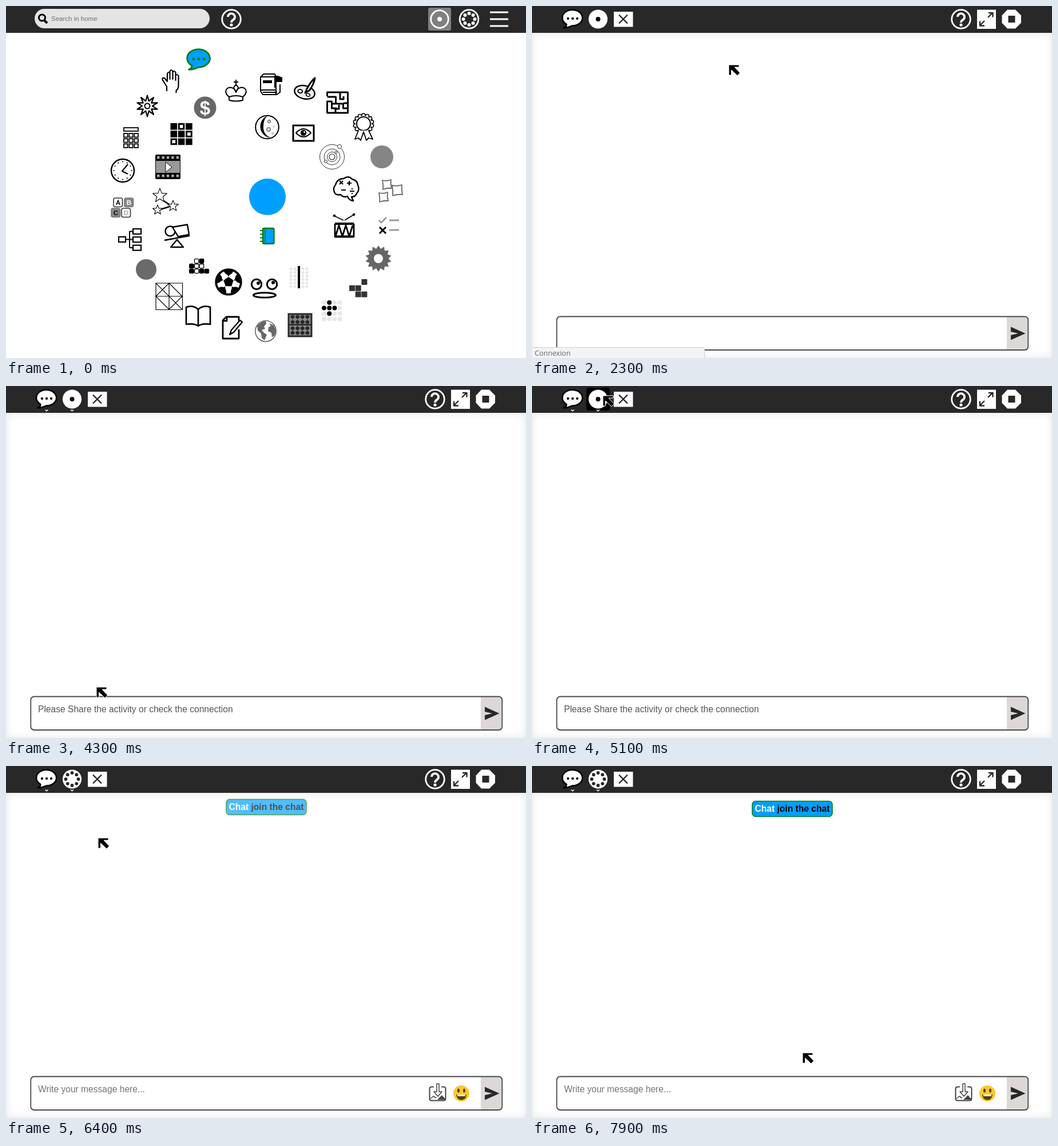
An HTML page for the animation above (8 s loop, 909 by 616 pixels).

```html
<!DOCTYPE html>
<html lang="en">
<head>
<meta charset="utf-8">
<title>Opening a shared chat</title>
<style>
html, body { margin: 0; width: 100%; height: 100%; overflow: hidden; background: #fff; }
svg { position: absolute; left: 0; top: 0; display: block; }
#shade { position: absolute; left: 0; top: 47px; width: 909px; height: 569px; box-shadow: inset 0 0 16px rgba(0,0,0,.1); }
text { font-family: "Liberation Sans", Arial, sans-serif; }
</style>
</head>
<body>
<div id="shade"></div>
<svg id="stage" width="909" height="616" viewBox="0 0 909 616"></svg>
<script>
const BLUE = '#009fff', GREEN = '#087f12', DARK = '#282828', GREY = '#666';

// Shape helpers, each returns SVG markup
const path = (d, w = 2, fill = 'none', stroke = '#000') =>
  `<path d="${d}" fill="${fill}" stroke="${stroke}" stroke-width="${w}" stroke-linejoin="round"/>`;
const solid = (d, fill = '#000') => `<path d="${d}" fill="${fill}"/>`;
const circ = (x, y, r, fill = '#000', stroke = 'none', w = 0) =>
  `<circle cx="${x}" cy="${y}" r="${r}" fill="${fill}" stroke="${stroke}" stroke-width="${w}"/>`;
const oval = (x, y, rx, ry, fill = '#000', stroke = 'none', w = 0) =>
  `<ellipse cx="${x}" cy="${y}" rx="${rx}" ry="${ry}" fill="${fill}" stroke="${stroke}" stroke-width="${w}"/>`;
const rect = (x, y, w, h, fill = '#000', stroke = 'none', sw = 0, r = 0) =>
  `<rect x="${x}" y="${y}" width="${w}" height="${h}" rx="${r}" fill="${fill}" stroke="${stroke}" stroke-width="${sw}"/>`;
const text = (x, y, size, s, fill = '#000', more = '') =>
  `<text x="${x}" y="${y}" font-size="${size}" fill="${fill}" ${more}>${s}</text>`;
const group = (id, body) => `<g id="${id}">${body}</g>`;
const move = (x, y, body) => `<g transform="translate(${x} ${y})">${body}</g>`;
const times = (n, f) => Array.from({ length: n }, (_, i) => f(i)).join('');
const grid = (cols, rows, f) => times(rows, r => times(cols, c => f(c, r)));
const polar = (x, y, r, a) => [x + r * Math.sin(a), y - r * Math.cos(a)];
const star = (x, y, n, out, inn) => 'M' + Array.from({ length: 2 * n }, (_, i) =>
  polar(x, y, i % 2 ? inn : out, i * Math.PI / n).map(v => v.toFixed(1))).join('L') + 'Z';
const ring = (x, y, r, n, f) => times(n, i => f(...polar(x, y, r, i * 2 * Math.PI / n)));

const bubble = (x, y, k, fill, line, dot) => move(x, y, `<g transform="scale(${k})">` +
  path('M-12,11A19.5,15.5 0 1 1 -1,14Q-9,18 -17,18Q-11,15 -12,11Z', 2.8, fill, line) +
  times(3, i => circ(9 * i - 9, 0, 2.4, dot)) + '</g>');
const help = x => circ(x, 23, 16.3, 'none', '#fff', 2.8) +
  path(`M${x - 6},19a6,6 0 1 1 9.5,5q-3.5,2 -3.5,5`, 3.8, 'none', '#fff') + circ(x, 33, 2.6, '#fff');
const disc = (x, y, shared) => circ(x, y, 16.6, '#fff') + (shared
  ? ring(x, y, 11, 8, (a, b) => circ(a, b, 2.9, DARK)) : circ(x, y, 4, '#000'));

const homeBar = rect(50, 5, 306, 34, '#e4e4e4', 'none', 0, 17) +
  circ(63, 20.5, 5.5, 'none', '#000', 3) + path('M67,25L72,30', 4) +
  text(79, 26, 11.5, 'Search in home', '#707070') + help(394) +
  rect(738, 3, 40, 40, '#808080', 'none', 0, 3) + circ(758, 23, 15.3, 'none', '#fff', 2.8) + circ(758, 23, 4, '#fff') +
  circ(809.5, 23, 16.3, 'none', '#fff', 2.8) + ring(809.5, 23, 10, 8, (x, y) => circ(x, y, 3, '#fff')) +
  path('M846,11h32M846,23h32M846,35h32', 2.8, 'none', '#fff');

const tiles = { A: [188, 336, '#fff', '#000'], B: [207, 336, '#888', '#fff'], C: [184, 354, '#888', '#000'], D: [202, 354, '#fff', '#aaa'] };
const icons = [
  bubble(337, 93, 1.02, BLUE, GREEN, GREEN),
  // hand, king, books
  path('M281,149v-8l-7,-11q-2,-5 3,-4l5,6v-14q2.5,-4 4.5,0v10v-14q2.5,-4 5,0v14v-12q2.5,-4 5,0v14v-8q2.5,-4 5,0v17q0,6 -4,9v4', 2.2),
  path('M390,165v-6q-8,-6 -5,-13q6,-7 15,0l2,5l2,-5q9,-7 15,0q3,7 -5,13v6q-12,3 -24,0M390,159q12,-4 24,0M402,129v11M398,133h8M402,151l-4,-8q4,-9 8,0z', 1.9),
  path('M450,119h20l2,5h-27v25l4,6h24l6,-4v-14M445,125l5,-6M445,147h27M449,151h25M472,124v31', 2),
  solid('M469,122h6l8,3v8h-10v10h-4zM449,130h16v5h-16z'),
  // paint, maze, award
  `<g transform="rotate(14 522 151)">${oval(522, 151, 18, 11.5, '#eee', '#000', 2.4)}${oval(514, 151, 4, 3, '#fff', '#000', 2)}${oval(529, 154, 3.5, 2.5, '#fff', '#000', 1.6)}</g>`,
  path('M540,126Q532,133 526,145l-3,7l7,-4Q538,138 540,126z', 3, '#fff'),
  path('M561.5,158v-7h36v36h-36v-20h8v12h9M561.5,159h15v12h13v8h8M569,151v0M584,151v12h6v-5M576,187v-7h6v-7M597,170h-7M569,171h7', 3),
  ring(625, 206, 15, 14, (x, y) => circ(x, y, 3, '#fff', '#000', 1.6)) + circ(625, 206, 14, '#fff') + circ(625, 206, 12, '#fff', '#000', 2),
  path('M616,218l-6,15l6,-2l4,4l5,-15l5,15l4,-4l7,2l-7,-15', 1.8, '#fff'),
  // gear, coin, calculator, grid
  path(star(247, 175, 10, 18.5, 9), 2.2) + circ(247, 175, 4.5, 'none', '#000', 2),
  circ(348, 178, 19.5, '#676767') + text(348, 190, 33, '$', '#fff', 'text-anchor="middle" font-weight="bold"'),
  rect(206, 213, 25, 6, '#fff', '#000', 1.8) + grid(3, 3, (c, r) => rect(206 + 9.2 * c, 223 + 9.2 * r, 6.5, 6.5, '#fff', '#000', 1.8)),
  grid(3, 3, (c, r) => rect(287.5 + 13.3 * c, 205 + 13.3 * r, 11.6, 11.6) +
    ([1, 5, 6].includes(c + 3 * r) ? rect(290.5 + 13.3 * c, 208 + 13.3 * r, 5.6, 5.6, '#fff') : '')),
  // film, clock, letters, stars
  rect(261, 260, 44, 43, '#000', 'none', 0, 2) + rect(262, 271, 42, 21, '#999') +
    grid(5, 2, (c, r) => rect(264 + 8.4 * c, 263 + 32 * r, 4.5, 4.5, '#aaa', 'none', 0, 1)) + path('M279,273l11,9l-11,9z', 1, '#fff'),
  circ(204, 288, 20, '#fff', '#000', 2.4) + path('M213,277L203,289L213,294', 2.2) + ring(204, 288, 15.5, 12, (x, y) => circ(x, y, 1.1)),
  Object.entries(tiles).map(([k, [x, y, f, c]]) => rect(x, y, 15.5, 15.5, f, f == '#fff' ? '#333' : '#777', 1.6, 3) +
    text(x + 7.8, y + 12, 11.5, k, c, 'text-anchor="middle" font-weight="bold"')).join(''),
  path('M271,338L288,349M270,356L286,351', 2.6) + [[269, 332, 13], [265, 357, 9], [292, 350, 10]].map(([x, y, r]) => path(star(x, y, 5, r, r * .42), 1.1, '#fff')).join(''),
  // tree, scales
  path('M209,408.5h13M216,394v29M216,394.5h6M216,423h6', 2) + rect(197, 404, 12, 9, '#fff', '#000', 2.2) +
    times(3, i => rect(222, 390 + 14.3 * i, 14, 9, '#fff', '#000', 2.2)),
  circ(287, 394, 8.5, '#fff', '#000', 2.5) + path('M277,410L321,402M291,387l26,-4.500l3,17.500l-19,3.500z M299,409l-11,13h22z', 2.4, '#fff'),
  circ(245, 461, 18, '#6a6a6a'),
  // blocks, puzzle, ball
  [[1, 0, 0], [2, 0, 1], [0, 1, 1], [1, 1, 0], [2, 1, 0], [0, 2, 1], [1, 2, 0], [2, 2, 1], [3, 2, 1]].map(([c, r, on]) =>
    rect(320.7 + 8.8 * c, 442.7 + 8.8 * r, 7.4, 7.4, on ? '#000' : '#fff', '#000', 1.3, 1.5)).join(''),
  path('M262,485h46.500v46.500h-46.500zM262,508h46M285,485l23,23l-23,23l-23,-23zM262,485l46,46M285,485v46', 1.2),
  circ(389, 483, 21.8, '#fff', '#000', 3.8) + solid(star(389, 483, 5, 9, 7.3)) +
    times(5, i => `<g transform="rotate(${72 * i} 389 483)">${solid('M380,463h18l-3,5l-6,4l-6,-4z')}${path('M389,473v-4', 1.5)}</g>`),
  // book, face, dotted line
  path('M336,531Q328,523 315,527v30Q329,555 336,560Q343,555 357,557v-30Q344,523 336,531v28', 2.7, '#fff'),
  [438, 465].map(x => circ(x, 487, 8.7, '#fff', '#000', 3)).join('') + circ(441, 485, 3) + circ(467, 484, 3) + oval(452, 506, 19.5, 4.3, '#fff', '#000', 3),
  grid(5, 6, (c, r) => circ(498 + 7 * c, 460 + 6.2 * r, 2.5, '#e6e6e6')) + rect(510, 455, 4, 39),
  // moon, eye, planets
  circ(456.5, 212, 20.3, '#fff', '#000', 2) + solid('M457,192A20.3,20.3 0 0 0 463,231Q449,225 450,210Q450,199 457,192z') +
    circ(460, 202, 2.5, '#ddd', '#000', .8) + circ(459, 216, 3.5, '#ddd', '#000', .8) + circ(468, 211, 2.2, '#ddd') + circ(466, 223, 2.5, '#ccc'),
  rect(502, 209, 36, 27, '#fff', '#000', 3) + path('M507,222Q520,208 533,222Q520,236 507,222z', 2.2) + circ(520, 222, 5.2) + circ(521.5, 220.500, 1.5, '#fff'),
  [21.5, 14, 8.5].map(r => circ(570, 264, r, 'none', '#333', 1)).join('') + circ(570, 264, 5, '#fff', '#333', 1.2) +
    circ(583, 246, 3.5, '#fff', '#333', 1) + circ(559, 272, 2.5, '#fff', '#333', 1) + circ(577, 256, 2, '#fff', '#333', 1),
  circ(657, 264, 20, '#858585'),
  // brain, notes, drum, list
  path('M585,330q-8,2 -11,-4q-3,-8 2,-13q3,-11 14,-11q9,-6 15,1q9,2 10,10q4,9 -2,15q-2,6 -9,6l3,7q-8,-1 -10,-8q-7,3 -12,-3z', 2.4, '#fff') +
    path('M583,306l6,6m0,-6l-6,6M600,306v8m-4,-4h8M586,322h8M601,324h8', 2.2) + circ(605, 320, 1.2) + circ(605, 328, 1.2),
  [[658, 305, 15], [675, 314, 17], [652, 327, 15]].map(([x, y, s]) => path(`M${x},${y}q${s / 2},2 ${s},-1q-1,${s / 2} 1,${s}q${-s / 2},-1 ${-s},2q1,${-s / 2} -1,${-s - 1}z`, 1.8, '#fff', GREY)).join(''),
  rect(575, 379, 33, 4) + path('M575,381v23h33v-23M576,403l6,-19l6,19l6,-19l6,19l6,-19M575,403h33', 2.8) + path('M573,367l17,8M610,364l-18,11', 1.8) + circ(574, 367, 2.3) + circ(608, 365, 2.3),
  path('M652,375l4,4l9,-9', 2.8, 'none', '#999') + path('M670,375h17M670,392h17', 3, 'none', '#999') + path('M653,387l11,11m0,-11l-11,11', 3),
  // burst, pieces, dots, abacus
  solid(star(651, 442, 14, 23, 17.5), GREY) + circ(651, 442, 8, '#fff'),
  [[2, 0], [0, 1], [1, 1], [1, 2], [2, 2]].map(([c, r]) => rect(600 + 10.700 * c, 478 + 10.8 * r, 10, 10, '#333')).join(''),
  grid(4, 4, (c, r) => circ(556 + 9.2 * c, 519 + 9.6 * r, 4, [1, 4, 5, 6, 9].includes(c + 4 * r) ? '#000' : '#e8e8e8')),
  rect(494, 539, 40, 39, '#8a8a8a', '#2a2a2a', 3) + times(4, i => path(`M${501 + 8.600 * i},540v37`, 1, 'none', DARK) +
    [544, 553, 564, 572].map(y => oval(501 + 8.6 * i, y, 3.6, 2.9, DARK)).join('')) + rect(494, 556.5, 40, 2.5, DARK),
  // globe, page, journal
  circ(454, 569, 18.2, '#fff', GREY, 1.6) + solid('M439,560q6,-8 15,-9l1,5l-4,5l2,4l-6,2l4,5l5,3l-4,10l-5,-4l-1,-8l-6,-5zM460,555l8,4l4,9l-2,8l-5,4l-1,-8l-6,-3l1,-7l4,-2z', GREY),
  path('M407,566v16h-28v-32l6,-6h22v7M386,544v7h-7', 2.8) + path('M413,553l-15,18l-7,4l3,-8l15,-17z', 2.2, '#fff') + solid('M391,575l1.500,-5l4,3z'),
  rect(449, 389, 19.500, 27, BLUE, GREEN, 2.4, 2) + path('M453,389v27', 1.6, 'none', GREEN) + times(4, i => path(`M444,${393 + 6.300 * i}h7`, 2, 'none', GREEN)),
  circ(457, 334, 32, BLUE)
].join('');

const spots = [[462.5, 136.5], [402, 148], [337.5, 94]];
const home = times(spots.length, i => group('spot' + i, rect(spots[i][0] - 25.5, spots[i][1] - 25.5, 51, 51, '#cbcbcb', 'none', 0, 3))) + homeBar + icons;

const chat = group('pressed', rect(95, 3, 41, 40, '#000', 'none', 0, 4)) +
  bubble(71, 22, .9, '#fff', '#000', '#000') +
  group('alone', disc(115.5, 23, false)) + group('shared', disc(115.5, 23, true)) +
  group('chevrons', path('M68.500,41.500l2.500,2.200l2.500,-2.200M113,41.500l2.500,2.200l2.500,-2.200', 1.500, 'none', '#fff')) +
  rect(143, 10, 33.5, 26.5, '#fff') + path('M152,15.500l15,15m0,-15l-15,15', 2.4, 'none', DARK) + help(750) +
  rect(778, 6.5, 33, 33.5, '#fff') + path('M797,20l8,-8M798,12h7.500v7.500M791,26l-8,8M783,26.500v8h8', 2.4, 'none', DARK) +
  solid('M831,6.500h14l10,10v13l-10,10h-14l-9.500,-10v-13z', '#fff') + rect(832.5, 17, 12, 12, DARK) +
  rect(43, 543.5, 824.5, 58.5, '#fff', 'none', 0, 6) + solid('M830,544h32q5,0 5,5v48q0,5 -5,5h-32z', '#dcd8d8') +
  rect(43.3, 543.5, 824, 58.500, 'none', '#48484a', 1.8, 6) + solid('M837,561.500L862.500,573L837,584.500V576L850,573L837,570z', DARK) +
  group('wait', text(56, 571, 15.6, 'Please Share the activity or check the connection', '#555')) +
  group('ready', text(56, 571, 15.6, 'Write your message here...', '#757575') +
    path('M748,561.500h-4q-3.500,0 -3.500,3.500v17q0,3.500 3.500,3.500h21q3.500,0 3.500,-3.500v-17q0,-3.500 -3.500,-3.500h-4', 2, 'none', '#444') +
    path('M742,582l5,-4l5,3', 1.500, 'none', '#444') + solid('M754,584l8,-8l7,8z', '#444') +
    path('M753,556h4v14h5l-7,8l-7,-8h5z', 1.5, '#fff', '#444') +
    circ(796, 573, 14, '#fcc82c') + oval(791, 568, 2, 3.5, '#5d3b16') + oval(801, 568, 2, 3.5, '#5d3b16') +
    solid('M787,575h18q-1,9.500 -9,9.500t-9,-9.500z', '#5d3b16') + rect(789, 575, 14, 2.8, '#fff')) +
  group('note', rect(385, 61.5, 140, 27, BLUE, GREEN, 1.6, 6) +
    text(389.5, 80, 15.6, '<tspan fill="#fff">Chat</tspan> join the chat', '#000', 'font-weight="bold"')) +
  group('menu', rect(93, 46, 105, 109, '#000', '#808080', 2) + path('M93,46V1h45v45', 2, '#000', '#808080') + rect(94, 44, 43, 4) +
    disc(115.5, 23, false) + disc(146, 74, false) + disc(146, 126, true));

document.getElementById('stage').innerHTML =
  rect(0, 0, 909, 47, DARK) + group('home', home) + group('chat', chat) +
  group('status', rect(-4, 597.5, 305.5, 24, '#f3f3f3', '#cfcfcf', 1, 3) + text(4.5, 611.5, 12.6, 'Connexion', GREY, 'style="font-family:\'Open Sans\',sans-serif;font-weight:500"')) +
  group('pointer', path('M0,0h18v4h-8l9.500,10l-4.500,5l-10.500,-10v9h-4.500z', 1, '#000', '#fff'));

const el = {};
document.querySelectorAll('[id]').forEach(e => el[e.id] = e);

// Pointer: start time, steps of 100 ms, end x, y, bend x, y
const moves = [
  [500, 1, 485, 138], [800, 5, 344, 103, 410, 122], [3200, 4, 223, 344, 195, 290],
  [3700, 4, 158, 545, 140, 500], [4300, 1, 158, 527], [4400, 1, 151, 321],
  [4600, 6, 124, 17, 180, 60], [5500, 6, 161, 126, 90, 80], [6500, 6, 165, 342, 160, 230],
  [7300, 5, 209, 543, 165, 470], [7900, 1, 473, 502]
];
function pointerAt(t) {
  let [x, y] = [485, 138];
  for (const [start, n, ex, ey, bx = ex, by = ey] of moves) {
    if (t < start) break;
    const k = Math.min(1, ((t - start) / 100 + 1) / n), j = 1 - k;
    x = j * j * x + 2 * j * k * bx + k * k * ex;
    y = j * j * y + 2 * j * k * by + k * k * ey;
  }
  return [x, y];
}

const clamp = v => Math.max(0, Math.min(1, v));
const show = (id, on) => { el[id].style.opacity = +on; };
function ease(p) {
  // CSS "ease": cubic-bezier(.25, .1, .25, 1)
  let lo = 0, hi = 1, u = p;
  for (let i = 0; i < 20; i++) {
    u = (lo + hi) / 2;
    const x = .75 * u * (1 - u) + u * u * u;
    if (x < p) lo = u; else hi = u;
  }
  return .3 * u * (1 - u) ** 2 + 3 * u * u * (1 - u) + u ** 3;
}

function draw(now) {
  const t = Math.floor(now % 8000 / 100) * 100;
  const [x, y] = pointerAt(t);
  const opened = t >= 2300, joined = t >= 6200;
  show('shade', t >= 500);
  show('pointer', t >= 500);
  el.pointer.setAttribute('transform', `translate(${x} ${y})`);
  spots.forEach(([a, b], i) => show('spot' + i, t >= 500 && Math.abs(x - a) < 25.5 && Math.abs(y - b) < 25.5));
  show('home', !opened);
  show('chat', opened);
  show('status', t >= 1500 ? clamp((3000 - t) / 500) : 0);
  show('chevrons', t >= 2600);
  show('wait', t >= 2600 && !joined);
  show('pressed', t < 5300 && x > 95 && x < 136 && y < 43);
  show('menu', t >= 5300 && !joined);
  show('alone', !joined);
  show('shared', joined);
  show('ready', joined);
  const p = ease(clamp((t - 6200) / 500));
  show('note', p);
  el.note.setAttribute('transform', `translate(0 ${10 * p - 10})`);
}

const began = performance.now();
function tick() {
  draw(performance.now() - began);
  requestAnimationFrame(tick);
}
tick();
</script>
</body>
</html>
```
